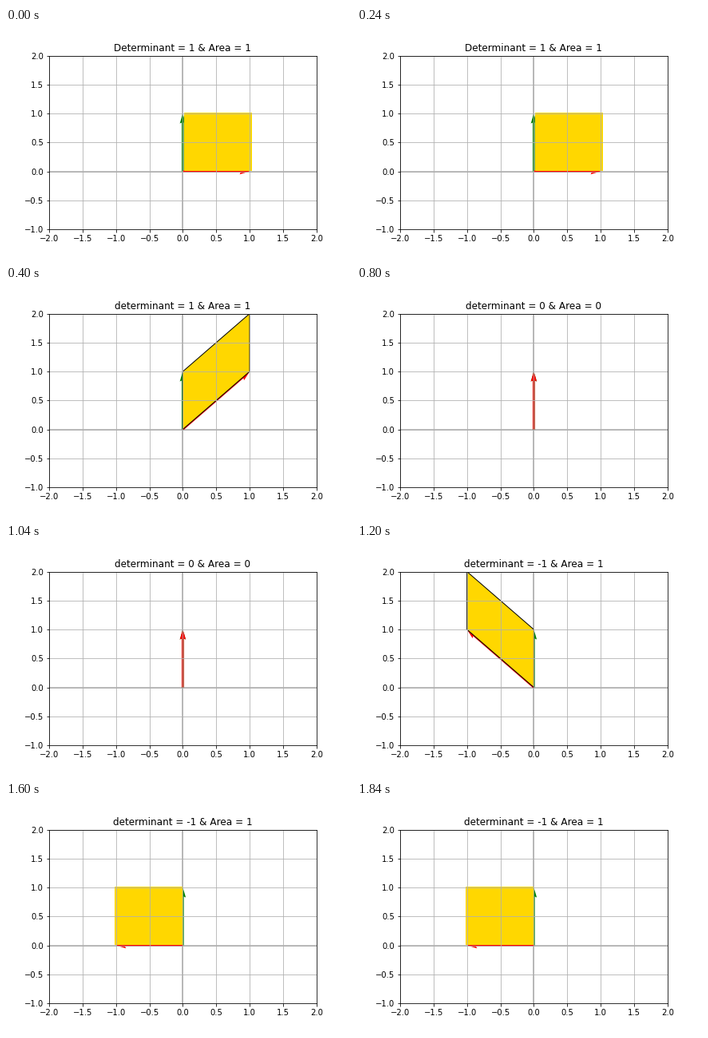
A matplotlib script for the animation above (2 s loop, 432 px wide and 288 px high).

```python
import matplotlib.pyplot as plt
from matplotlib.animation import FuncAnimation
from matplotlib.patches import Polygon, Rectangle
import numpy as np

plt.rcParams["font.family"] = "DejaVu Sans"

GAP = 0.02  # keeps the axis-aligned squares clear of the arrows

# (red vector, label, determinant); the green vector is always (0, 1)
STEPS = [
    ((1, 0), "Determinant", 1),
    ((1, 1), "determinant", 1),
    ((0, 1), "determinant", 0),
    ((-1, 1), "determinant", -1),
    ((-1, 0), "determinant", -1),
]
GREEN = np.array([0, 1])

fig, ax = plt.subplots(figsize=(6, 4), dpi=72)
fig.subplots_adjust(left=0.125, right=0.9, bottom=0.125, top=0.88)


def arrow(vec, color):
    ax.quiver([0], [0], [vec[0]], [vec[1]], color=color,
              angles="xy", scale_units="xy", scale=1)


def area(red):
    if red[0] == 0:
        return
    if red[1] == 0:
        left = GAP if red[0] > 0 else -1 - GAP
        ax.add_patch(Rectangle((left, GAP), 1, 1, color="gold"))
    else:
        corners = [(0, 0), red, red + GREEN, GREEN]
        ax.add_patch(Polygon(corners, facecolor="gold", edgecolor="black"))


def draw(i):
    vec, label, det = STEPS[i]
    red = np.array(vec)
    ax.clear()
    ax.axvline(0, color="#A9A9A9", zorder=0)
    ax.axhline(0, color="#A9A9A9", zorder=0)
    arrow(GREEN, "green")
    arrow(red, "red")
    area(red)
    ax.set_xlim(-2, 2)
    ax.set_ylim(-1, 2)
    ax.set_xticks(np.arange(-2, 2.1, 0.5))
    ax.set_yticks(np.arange(-1, 2.1, 0.5))
    ax.grid(True)
    ax.set_title(f"{label} = {det} & Area = {abs(det)}")
    return []


anim = FuncAnimation(fig, draw, frames=len(STEPS), interval=400,
                     repeat=True, repeat_delay=0, init_func=lambda: draw(0))
plt.show()
```
